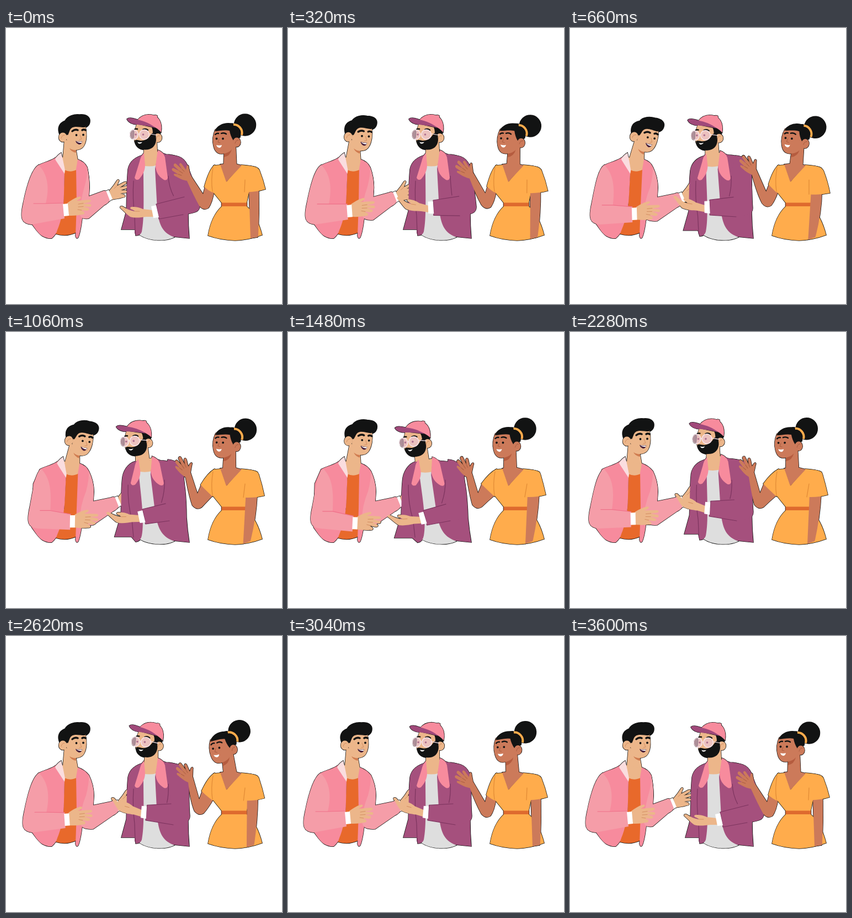
Recreate the animation shown at these times as an HTML page. Size 500x500 px, loop 3.64 s.

```html
<!DOCTYPE html>
<html lang="en">
<head>
<meta charset="utf-8">
<title>Three friends talking</title>
<style>
html, body { margin: 0; width: 100%; height: 100%; overflow: hidden; background: #fff; }
svg { display: block; width: 100vw; height: 100vh; }
.ink { fill: #121313; }
.skin { fill: #ecb68a; }
.brown { fill: #cc7a5a; }
.pink { fill: #f78b9d; }
.rose { fill: #f59da8; }
.plum { fill: #a5507d; }
.sun { fill: #ffac4c; }
.white { fill: #fff; }
.line { fill: none; stroke-linecap: round; stroke-linejoin: round; stroke-width: 1.2; }
.brow { stroke: #121313; stroke-width: 3.4; }
.thin { stroke-width: 2.4; }
.fold { stroke: #ef7089; }
.seam { stroke: #7d345f; }
.crease { stroke: #d08a5e; stroke-width: .9; }
.dark { stroke: #a55a3e; stroke-width: .9; }
.hem { stroke: #e08a35; }
.band { stroke: #ffac4c; stroke-width: 4; stroke-linecap: butt; }
.frame { stroke: #f8e6ec; }
</style>
</head>
<body>
<svg viewBox="0 0 500 500">
<use href="#all" stroke="#111" stroke-width="1.5"/>
<g id="all">

<!-- man in the pink jacket -->
<g>
  <g id="headA">
    <path class="skin" d="M106 200L103 235C105 256 122 272 132 250L126 216Z"/>
    <path fill="#d07c50" d="M115 218Q121 222 127 221L126.500 226Q118 224 115 218Z"/>
    <path class="ink" d="M97 193C93 182 95 173 107 168C112 159 124 156 133 157C146 156 153 161 152 170C151 178 145 181 140 181L118 186L112 198L104 196Z"/>
    <path class="skin" d="M110 193C113 187 117 180 124 178L144 179C147 190 146 205 142 212C138 221 126 223 118 219C112 214 109 205 110 193Z"/>
    <path class="ink" d="M109 172L146 170L143 180C134 180 125 177 119 181C115 184 115 189 112 194L106 192Z"/>
    <ellipse class="skin" cx="103" cy="198" rx="7.500" ry="8.500"/>
    <path class="line crease" d="M100 200Q101 194 106 194"/>
    <path class="line brow" d="M120 187Q125 183 130 185M138 185Q141 183 144 185"/>
    <circle class="ink" cx="127.500" cy="194" r="1.900"/><circle class="ink" cx="140" cy="193.500" r="1.900"/>
    <path class="line crease" d="M134 194L137 201L133 202"/>
    <path fill="#47203a" d="M126 204.500Q132 206 138 205Q137 211.500 132 211Q127 209 126 204.500Z"/>
    <path class="white" d="M127 205Q132 206.500 137.500 205.500L137 208Q131 208.500 127 205Z"/>
  </g>
  <g id="torsoA">
    <path class="skin" d="M101 234L130 240L129 262H106Z"/>
    <path fill="#e8692b" d="M106 257Q117 263 129 256L131 310L128 370Q110 379 90 373L104 320Z"/>
    <path class="pink" d="M97 229C85 241 70 242 58 249L47 275L46 354C52 362 58 372 66 377Q75 382 83 381Q91 374 93 366C100 350 105 325 105 300L106 263Z"/>
    <path fill="#fadddf" d="M100 226Q92 231 89 238L106 264L107 258L103 238Z"/>
  </g>
  <path id="panelA" class="pink"/>
  <path id="upperA" class="rose"/>
  <g id="farHandA">
    <path class="skin" d="M187 295L195 285L201 276C204 273 206 276 204 279L201 286L214 279C219 277 220 281 216 283L206 289L217 286C221 286 221 290 217 291L208 294L217 294C221 296 219 299 215 299L207 300L214 302C218 305 215 307 211 307C204 310 199 309 192 311Z"/>
    <path class="line crease" d="M201 286L196 291"/>
    <path class="white" d="M180 296L186 293L193 310L187 314Z"/>
  </g>
  <path id="farArmA" class="rose"/>
  <path id="armA" class="rose"/>
  <path id="foldA" class="line fold"/>
  <g id="handA">
    <path class="skin" d="M111 317C118 312 124 308 131 306C136 304 137 308 133 310L128 313L150 311C155 311 155 315 150 316L139 318L152 319C156 320 155 324 151 324L139 323L148 326C152 327 151 331 146 331L135 330L141 333C144 336 141 338 137 338C128 340 121 340 112 340Z"/>
    <path class="line crease" d="M140 317.500L131 319M140 323.500L131 324M137 330L130 329"/>
    <path class="white" d="M103 319L112 318L114 340L105 341Z"/>
  </g>
</g>

<!-- man in the cap -->
<g>
  <g id="headB">
    <path class="skin" d="M250 210L249 240Q260 262 275 244L273 200Z"/>
    <path class="ink" d="M258 176L281 184L279 194L270 206L262 200Z"/>
    <path class="skin" d="M237 174C233 184 231 196 233 206L250 214L264 200C267 192 266 184 264 180Z"/>
    <ellipse class="skin" cx="275" cy="199" rx="7.500" ry="8"/>
    <path class="line crease" d="M272 201Q273 195 278 195"/>
    <path class="ink" d="M233 204C236 201 241 204 246 204C256 203 260 197 264 191L271 189L272 203C271 214 264 220.500 253 220.500C241 221 234 214 233 204Z"/>
    <path class="white" d="M238 206.500Q242 208 247 206.500Q244 211 240 209Z"/>
    <path class="line brow thin" d="M233 184Q235 182 238 183M248 184Q253 181.500 257 185"/>
    <g class="frame" fill="#ecc7d6" fill-opacity=".7" stroke-width="1.500">
      <ellipse cx="232" cy="193" rx="7.500" ry="8.500"/><ellipse cx="250.500" cy="193" rx="8.800" ry="8.800"/>
    </g>
    <path fill="#8f737a" fill-opacity=".6" d="M231 185C223 185 223 201 230 201Q233 193 231 185Z"/>
    <g fill="#b0708f"><circle cx="235" cy="193" r="1.800"/><circle cx="248.500" cy="193" r="1.800"/></g>
    <path class="line frame" d="M239.500 192H241.500M259 191.500L273 194"/>
    <path class="pink" d="M267 160Q269 156 274 159L274 163Z"/>
    <path class="pink" d="M238 167C245 158 255 156 263 157C277 159 284 171 281 189C274 180 258 173 238 167Z"/>
    <path fill="#a0497a" d="M219 165C222 161.500 230 163 238 166C250 168.500 262 173 271 181C256 177 246 176 238 175C230 175 221 171 219 165Z"/>
  </g>
  <g id="torsoB">
    <path class="skin" d="M248 230L276 224L274 252H248Z"/>
    <path fill="#dedede" d="M247 249Q260 252 272 249L276 330C280 360 290 371 305 379C290 387 260 387 242 375C248 360 249 340 248 300Z"/>
    <path class="plum" d="M276 224L290 229C302 229 320 233 327 248C332 270 332 300 330 335C330 355 331 370 332 381L303 378C281 370 277 352 274 330L270 255Z"/>
  </g>
  <path id="panelB" class="plum"/>
  <path id="seamB" class="line seam"/>
  <g id="collarB">
    <path class="pink" d="M250 226Q244 232 242 242L233 271Q235 277 241 274C248 266 252 258 252 248Z"/>
    <path class="pink" d="M275 221Q285 224 288 234L293 271Q292 277 286 275C276 269 271 260 271 249Z"/>
  </g>
  <path id="armB" class="plum"/>
  <path id="foldB" class="line seam"/>
  <g id="handB">
    <path class="skin" d="M266 330L248 328C240 324 233 324 228 324C224 324 224 328 229 329L234 332C224 331 218 327 211 323C207 322 205 325 208 327C214 332 219 338 225 342C234 345 245 343 254 342L267 342Z"/>
    <path class="line crease" d="M234 332L242 332"/>
    <path class="white" d="M263 323L272 321L277 343L267 344Z"/>
  </g>
</g>

<!-- woman in the yellow dress -->
<g>
  <g id="headC">
    <path class="brown" d="M395 218L394 252L402 270L418 252L416 206Z"/>
    <path fill="#b55c3f" d="M395 227Q404 226 409 220Q406 232 395 234Z"/>
    <circle class="ink" cx="433" cy="175.500" r="19.500"/>
    <path class="brown" d="M379 184C374 195 374 206 376 214C379 227 387 230 397 227C408 224 416 212 417 200L404 181Z"/>
    <path class="ink" d="M378 187C384 177 394 172 406 173C416 172 425 178 426 187L424 198L412 204C408 198 406 192 405 186C396 184 386 187 378 187Z"/>
    <ellipse class="brown" cx="418" cy="207" rx="7" ry="8.500"/>
    <path class="line dark" d="M415 209Q416 203 421 203"/>
    <path class="line band" d="M412 175C421 174 430 184 427 194"/>
    <path class="line brow thin" d="M379 193Q382 190 385 191M390 191Q395 189 399 192"/>
    <circle class="ink" cx="381.500" cy="200.500" r="1.900"/><circle class="ink" cx="393" cy="200.500" r="1.900"/>
    <path class="line dark" d="M386 201L384 207L388 208"/>
    <path class="white" d="M381 212Q386 213.500 391 212Q390 217 386 217Q382 216 381 212Z"/>
  </g>
  <path id="armC" class="brown"/>
  <g id="handC">
    <path class="brown" d="M331 277C325 277 316 274 308 269C303 267 303 264 306 264L312 265L302 259C299 256 301 253 304 254L314 259L304 250C303 246 306 244 309 247L319 256L314 248C314 244 317 244 319 247L326 257L327 251C328 247 331 248 331 252L334 268L339 278Z"/>
    <path class="line dark" d="M312 265L318 267M314 259L320 263M319 256L323 260"/>
  </g>
  <path class="sun" d="M376 249L390 248L400 278L426 248C440 249 452 251 456 254L440 298L436 317L436 323C450 335 459 355 464 375Q440 384 415 385Q388 384 366 376C370 352 378 335 391 323L391 317L374 296Z"/>
  <path class="brown" d="M388 247L399 279L427 249L416 246L396 246Z"/>
  <path fill="#de6a2e" d="M390.500 316.500H436.500V323H390.500Z"/>
  <path id="farArmC" class="brown"/>
  <path id="farSleeveC" class="sun"/>
  <path id="sleeveC" class="sun"/>
  <path id="foldC" class="line hem"/>
</g>
</g>
</svg>
<script>
const LOOP = 3640;

const $ = id => document.getElementById(id);
const draw = (id, d) => $(id).setAttribute('d', d);
const place = (id, t) => $(id).setAttribute('transform', t);

function ease(u) {
  u = Math.min(1, Math.max(0, u));
  return u * u * (3 - 2 * u);
}

// Rises from a to b, holds until c, falls back by d.
const swing = (t, a, b, c, d) => ease((t - a) / (b - a)) * (1 - ease((t - c) / (d - c)));

// Weighted sum of [x, y, angle] moves.
const blend = (...moves) => [0, 1, 2].map(i => moves.reduce((sum, [w, m]) => sum + w * m[i], 0));

const turn = ([x, y, r], px, py) => `translate(${x} ${y}) rotate(${r} ${px} ${py})`;

// Where point q lands under the same turn.
function moved([x, y, r], px, py, qx, qy) {
  const a = r * Math.PI / 180, c = Math.cos(a), s = Math.sin(a), dx = qx - px, dy = qy - py;
  return `${px + x + dx * c - dy * s} ${py + y + dx * s + dy * c}`;
}

// Leans a torso sideways about its hem, lowering the top by drop.
function lean(x, drop = 0) {
  const k = -x / 150, s = 1 - drop / 150;
  return `matrix(1 0 ${k} ${s} ${-380 * k} ${380 * (1 - s)})`;
}

function manA(t, reach) {
  const nod = swing(t, 0, 660, 660, 2300);
  const point = swing(t, 0, 1480, 1600, 3000);
  const hand = blend([point, [11, 17, 8]], [nod, [3.5, 0, 0]]);
  const [o, oy] = hand, x = 16 * reach, y = 4 * reach, e = 8 * reach, l = 4 * nod;

  place('headA', turn(blend([nod, [5, 1, 12]]), 117, 235));
  place('torsoA', lean(l));
  place('handA', turn(hand, 109, 330));
  place('farHandA', `translate(${x} ${y})`);

  const shoulder = 147 + e * .4;
  draw('panelA', `M${130 + l} 238Q${142 + l} 242 ${shoulder} 252Q${151 + e} 272 ${151 + e} 290L${148 + e} 330L138 345Q135 370 131 379Q128 384 126 377L128 320L${127 + l} 255Z`);
  draw('upperA', `M${shoulder} 252Q${151 + e} 270 ${151 + e} 288L${149 + e} 332L134 340Q134 315 ${142 + e * .4} 288Q${148 + e * .3} 268 ${shoulder} 252Z`);
  draw('farArmA', `M${147 + e} ${306 + y * .3}L${174 + x} ${296 + y}Q${180 + x} ${293 + y} ${182 + x} ${297 + y}L${188 + x} ${312 + y}Q${186 + x} ${317 + y} ${178 + x} ${321 + y}L${150 + e} ${345 + e * .6}Q138 ${347 + e * .5} 135 341L${136 + e * .3} 328Z`);

  const top = moved(hand, 109, 330, 104, 317), low = moved(hand, 109, 330, 106, 345);
  const fx = 72 + o * .7, fy = 318 + oy * .4;
  draw('armA', `M${59 + o * .4} 248C${46 + o * .5} 256 ${37 + o} 288 ${31 + o} 318C${25 + o} 345 ${28 + o} 354 ${46 + o} 356L${low}L${top}L${fx} ${fy}C${79 + o * .3} 290 ${76 + o * .4} 265 ${59 + o * .4} 248Z`);
  draw('foldA', `M${50 + o} ${fy}L${fx} ${fy}L${top}`);
}

function manB(t, reach, settle) {
  const bend = swing(t, 330, 1400, 1500, 2500);
  const dip = swing(t, 300, 1300, 1450, 2100);
  const hand = blend([reach, [-20, -15, 16]], [bend, [-6, 0, 0]], [dip, [0, 20, -20]]);
  const l = -13 * bend, drop = 8 * bend;

  place('headB', turn(blend([bend, [-22, 4, -6]], [settle, [2.5, 0, 3]]), 265, 200));
  for (const id of ['torsoB', 'collarB']) place(id, lean(l, drop * .6));
  place('handB', turn(hand, 265, 333));

  draw('panelB', `M${248 + l} ${230 + drop * .6}C${236 + l} 234 ${224 + l} ${240 + drop} ${221 + l} ${256 + drop}C${218 + l} 285 ${219 + l} 310 ${218 + l} 332L${209 + l * 1.25} ${365 + drop}L${234 + l * .7} ${365 + drop}L235 ${376 + drop * .7}Q244 ${376 + drop * .5} 246 369C251 345 ${249 + l * .4} 300 ${249 + l * .8} 262Z`);
  draw('seamB', `M${231 + l} 277Q${229 + l * .9} 310 ${233 + l * .5} 340L${234 + l * .3} 372`);

  const top = moved(hand, 265, 333, 272, 319), low = moved(hand, 265, 333, 277, 346);
  const ex = 351 - 18 * reach + l * .7, ey = 322 + 4 * reach;
  const ix = 323 - 24 * reach + l, iy = 306 - 2 * reach + 8 * dip;
  const side = 331 + l, seam = 294 + l * .7;
  draw('armB', `M${seam} 262L${303 + l} 231C${320 + l} 232 ${side - 3} 242 ${side + 1} 258Q${ex - 2} ${ey - 22} ${ex} ${ey}C${ex} ${ey + 12} ${ex - 10} ${ey + 13} ${ex - 30} ${ey + 16}L${low}L${top}L${ix} ${iy}Z`);
  draw('foldB', `M${seam} 268Q${seam + 1} 288 ${(ix + 290 + l) / 2 - 3} ${iy - 2}M${ix} ${iy}L${top}L${low}L${ex - 30} ${ey + 16}`);
}

function woman(t, settle) {
  const nod = swing(t, 0, 660, 660, 1300);
  const wave = swing(t, 0, 1300, 2250, 3040);
  const hand = blend([wave, [-3, -12, 23]], [nod, [4, -4, 0]], [settle, [5, -4, 0]]);
  const ex = 6 * nod - 16 * wave, ey = -9 * wave;
  const sx = 5 * nod - 9 * wave, sy = 2 * nod - 13 * wave;
  const rx = 2.5 * nod - 3 * wave, ry = 5.5 * nod + 3 * wave;
  const ax = -6 * wave, bx = -5 * nod - 13 * wave;

  place('headC', turn(blend([nod, [7, 1, 6]], [wave, [-3.5, 0, 0]], [settle, [0, 0, -8]]), 405, 235));
  place('handC', turn(hand, 332, 272));

  const inner = moved(hand, 332, 272, 334, 266), wrist = moved(hand, 332, 272, 327, 275);
  draw('armC', `M${inner}L${357 + ex * .8} ${301 + ey}L${361 + sx} ${286 + sy}L${377 + sx * .3} 296Q${374 + ex * .8} ${316 + ey} ${367 + ex} ${326 + ey}Q${358 + ex} ${332 + ey} ${350 + ex} ${322 + ey}Q${340 + ex * .7} ${304 + ey} ${wrist}Z`);
  draw('sleeveC', `M378 248Q${368 + sx * .4} 255 ${359 + sx} ${288 + sy}Q${366 + sx * .7} ${294 + sy * .7} 374 298L389 275Z`);
  draw('farArmC', `M${440 + ax} 294L${458 + ax * .5} 294Q${459 + ax} 335 ${457 + bx} 376L${456 + bx} 379L${443 + bx} ${381 - bx * .2}Z`);
  draw('farSleeveC', `M440 250Q456 251 ${459 + rx * .5} ${257 + ry * .3}Q${466 + rx} ${275 + ry * .5} ${470 + rx} ${292 + ry}Q${452 + rx} ${298 + ry * .7} ${432 + rx} ${297 + ry * .6}L430 270Z`);
  draw('foldC', `M375 253Q371 275 374 296M433 275L${432 + rx} ${297 + ry * .6}`);
}

function frame(now) {
  const t = now % LOOP;
  const reach = swing(t, 0, 600, 3040, 3600);
  const settle = swing(t, 2200, 2650, 2650, 3300);
  manA(t, reach);
  manB(t, reach, settle);
  woman(t, settle);
  requestAnimationFrame(frame);
}

frame(0);
</script>
</body>
</html>
```
